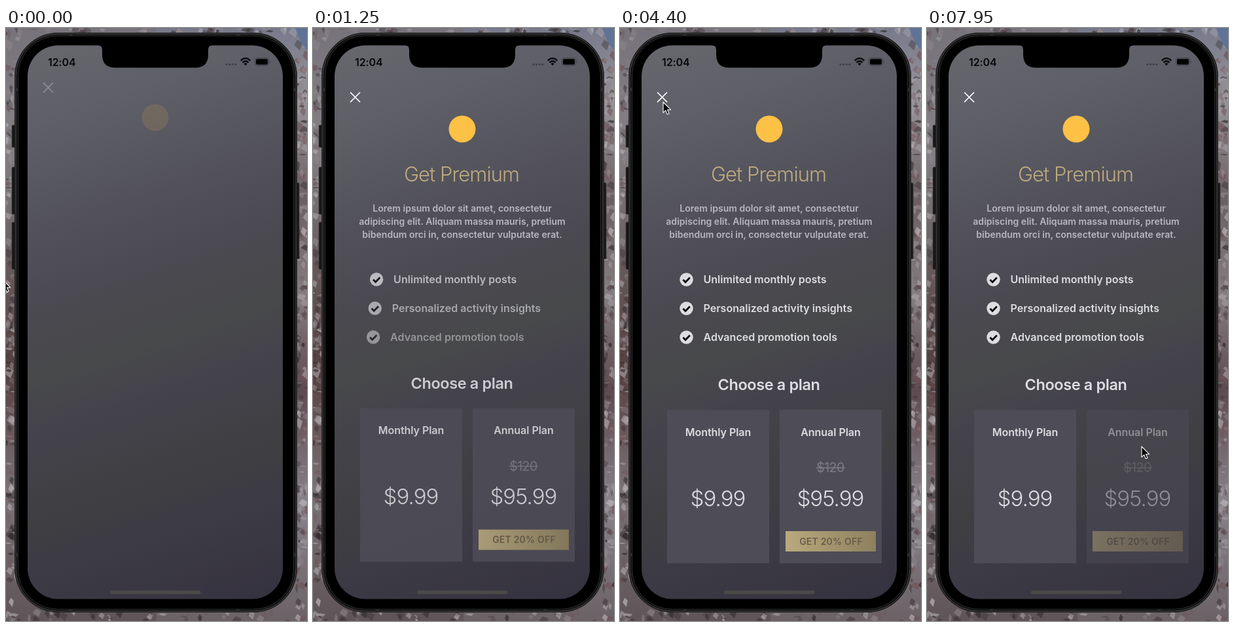
An HTML page for the animation above (8 s loop, 460 by 904 pixels).

```html
<!DOCTYPE html>
<html lang="en">
<head>
<meta charset="utf-8">
<title>Get Premium</title>
<style>
  html, body { margin: 0; width: 100%; height: 100%; overflow: hidden; background: #000; }
  svg { display: block; }
  text { font-family: Inter, "Liberation Sans", sans-serif; font-weight: 600; fill: #dddde1; white-space: pre; }
  .mid { text-anchor: middle; }
  .time { font-size: 16px; fill: #08080a; letter-spacing: -.1px; }
  .title { font-size: 31px; font-weight: 350; fill: #bdaa7d; letter-spacing: -.95px; }
  .lead { font-size: 14px; fill: #b8b7c0; letter-spacing: .03px; }
  .row { font-size: 16px; letter-spacing: .03px; }
  .choose { font-size: 23.5px; letter-spacing: -.4px; }
  .plan { font-size: 16px; letter-spacing: -.04px; }
  .price { font-size: 33px; font-weight: 350; letter-spacing: -.95px; }
  .old { font-size: 19.5px; font-weight: 400; fill: #7e7d87; letter-spacing: -.5px; }
  .offer { font-size: 14px; fill: #695d48; letter-spacing: .2px; }
</style>
</head>
<body>
<svg width="460" height="904" viewBox="0 0 460 904">
  <defs>
    <linearGradient id="left" x2="0" y2="1">
      <stop offset="0" stop-color="#77737b"/><stop offset=".2" stop-color="#858085"/>
      <stop offset=".4" stop-color="#665a5c"/><stop offset=".58" stop-color="#553f40"/>
      <stop offset=".78" stop-color="#7b7176"/><stop offset="1" stop-color="#5f5558"/>
    </linearGradient>
    <linearGradient id="right" x2="0" y2="1">
      <stop offset="0" stop-color="#77798a"/><stop offset=".12" stop-color="#98959b"/>
      <stop offset=".29" stop-color="#6c5f62"/><stop offset=".45" stop-color="#857d80"/>
      <stop offset=".61" stop-color="#5e4a50"/><stop offset=".8" stop-color="#88828a"/>
      <stop offset="1" stop-color="#6b6266"/>
    </linearGradient>
    <linearGradient id="glass" gradientUnits="userSpaceOnUse" x1="33" y1="27" x2="322" y2="905">
      <stop offset="0" stop-color="#67686d"/><stop offset=".12" stop-color="#5f6068"/>
      <stop offset=".3" stop-color="#52515b"/><stop offset=".43" stop-color="#4a4950"/>
      <stop offset=".53" stop-color="#48494a"/><stop offset=".61" stop-color="#44434c"/>
      <stop offset=".75" stop-color="#3f3f42"/><stop offset=".85" stop-color="#3c3a45"/>
      <stop offset="1" stop-color="#35323f"/>
    </linearGradient>
    <linearGradient id="gold">
      <stop offset="0" stop-color="#b9a97e"/><stop offset="1" stop-color="#8d805e"/>
    </linearGradient>
  </defs>

  <rect width="230" height="904" fill="url(#left)"/>
  <rect x="230" width="230" height="904" fill="url(#right)"/>
  <g id="bark"></g>
  <path d="M442 0H460V34Q450 24 442 0Z" fill="#5e7396"/>

  <g fill="#171717" stroke="#3d3d3d" stroke-width=".8">
    <rect x="9" y="148" width="6" height="34" rx="1.5"/>
    <rect x="9" y="212" width="6" height="72" rx="1.5"/>
    <rect x="9" y="296" width="6" height="72" rx="1.5"/>
    <rect x="442" y="236" width="6" height="116" rx="1.5"/>
  </g>
  <rect x="13.5" y="7.5" width="431" height="883" rx="66" fill="#111" stroke="#222"/>
  <rect x="15" y="9" width="428" height="880" rx="64.5" fill="none" stroke="#4d4d4d"/>
  <rect x="18.5" y="12" width="421" height="874" rx="61" fill="#000" stroke="#2b2b2b"/>
  <path d="M14 94h5M14 803h5M439 94h5M439 803h5M99 8v4M355 8v4M99 886v4M355 886v4" stroke="#2b2b2b" stroke-width="5"/>
  <rect x="33" y="26.5" width="390" height="844" rx="47" fill="url(#glass)"/>
  <path d="M141 25H315V26.5Q309 26.5 309 33V40.5Q309 60.5 289 60.5H167Q147 60.5 147 40.5V33Q147 26.5 141 26.5Z"/>

  <text class="time" x="64" y="57.5">12:04</text>
  <g fill="#3f4046"><circle cx="337" cy="55.5" r="1.6"/><circle cx="341.6" cy="55.5" r="1.6"/><circle cx="346.2" cy="55.5" r="1.6"/><circle cx="350.8" cy="55.5" r="1.6"/></g>
  <g fill="none" stroke="#08080a" stroke-width="2.3">
    <path d="M358.7 49.6Q366 42.7 373.3 49.6M361.4 52.6Q366 48.4 370.6 52.6"/>
    <path d="M363.4 54.4Q366 52.3 368.6 54.4L366 57.2Z" fill="#08080a" stroke="none"/>
  </g>
  <rect x="380.5" y="45.8" width="21" height="11.4" rx="3.4" fill="none" stroke="#3d3e43"/>
  <rect x="382" y="47.3" width="18" height="8.4" rx="2"/>
  <path d="M403 49.8q2 1.7 0 3.6z" fill="#3d3e43"/>
  <rect x="159" y="857.5" width="138.5" height="5.5" rx="2.7" fill="#4b4a49"/>

  <g id="close"><path d="M57.5 98.5l14 14m0-14l-14 14" stroke="#fff" stroke-width="1.7" stroke-linecap="round"/></g>
  <circle id="badge" cx="228" cy="154" r="20.5" fill="#fdc145"/>
  <text id="title" class="title mid" x="227" y="234">Get Premium</text>
  <g id="lead" class="mid">
    <text class="lead" x="228" y="280">Lorem ipsum dolor sit amet, consectetur</text>
    <text class="lead" x="228" y="300">adipiscing elit. Aliquam massa mauris, pretium</text>
    <text class="lead" x="228" y="320">bibendum orci in, consectetur vulputate erat.</text>
  </g>
  <g id="rows"></g>
  <text id="choose" class="choose mid" x="227.5" y="552">Choose a plan</text>
  <g id="plans">
    <g id="monthly">
      <rect x="72" y="582" width="156" height="234" fill="#4e4c57"/>
      <text class="plan mid" x="150" y="621.5">Monthly Plan</text>
      <text class="price mid" x="149.5" y="728.5">$9.99</text>
    </g>
    <g id="annual">
      <rect x="244" y="582" width="156" height="234" fill="#4e4c57"/>
      <text class="plan mid" x="322" y="621.5">Annual Plan</text>
      <text class="old mid" x="321.5" y="677">$120</text>
      <path d="M299.5 670.5H344" stroke="#7e7d87" stroke-width="1.4"/>
      <text class="price mid" x="321.5" y="728.5">$95.99</text>
      <rect x="253" y="767" width="138" height="31" fill="url(#gold)"/>
      <text class="offer mid" x="322.5" y="787.5">GET 20% OFF</text>
    </g>
  </g>
  <path id="cursor" d="M0 0V16.2L3.8 12.7L6.3 18.6L9 17.4L6.5 11.7H11.6Z" stroke="#fff" stroke-width="1.1" stroke-linejoin="round"/>
</svg>
<script>
const $ = id => document.getElementById(id);
const LOOP = 8000;

function make(parent, tag, attrs, text) {
  const el = document.createElementNS("http://www.w3.org/2000/svg", tag);
  for (const k in attrs) el.setAttribute(k, attrs[k]);
  if (text) el.textContent = text;
  return parent.appendChild(el);
}

// Rough bark flecks along the visible margins
let seed = 11;
const rand = () => (seed = seed * 16807 % 2147483647) / 2147483647;
const tones = ["#aaa5a9", "#8f888c", "#41363a", "#2d2729", "#705457", "#bbb7bb"];
for (let i = 0; i < 420; i++) {
  const edge = i % 5;
  const x = edge < 2 ? rand() * 18 : edge < 4 ? 442 + rand() * 18 : rand() * 460;
  const y = edge < 4 ? rand() * 904 : rand() < .5 ? rand() * 9 : 889 + rand() * 15;
  const w = 4 + rand() * 12, h = 2 + rand() * 16;
  make($("bark"), "path", {
    d: `M${x - w / 2} ${y}l${w * .4} ${-h / 2}l${w * .6} ${h * .3}l${-w * .3} ${h * .7}z`,
    fill: tones[Math.floor(rand() * tones.length)], opacity: .3 + rand() * .4
  });
}

const rows = ["Unlimited monthly posts", "Personalized activity insights", "Advanced promotion tools"].map((label, i) => {
  const g = make($("rows"), "g", {}), y = 383.5 + i * 44;
  make(g, "circle", { cx: 101.5, cy: y, r: 10.2, fill: "#dddde1" });
  make(g, "path", { d: `M96.4 ${y + .3}l3.6 3.7l6.8-7`, fill: "none", stroke: "#0c0c0e", "stroke-width": 2.8 });
  make(g, "text", { class: "row", x: 127.5, y: y + 5.5 }, label);
  return g;
});

const ease = u => (1 - Math.cos(Math.PI * Math.min(1, Math.max(0, u)))) / 2;

// Start time of each drop-in
const drops = { close: -350, badge: -230, title: 140, lead: 145, rows: 320, choose: 470, plans: 475 };

// [element, pressed, released, fade length]
const taps = [
  ["monthly", 3050, 3170, 250], ["annual", 3550, 3670, 250],
  ["close", 4950, 4970, 190],
  ["monthly", 5950, 6070, 250], ["annual", 6400, 6520, 250],
  ["annual", 7800, 7845, 250]
];

const track = [
  [0, -5, 384], [90, -40, 384], [1750, -20, 650], [2450, 184, 606], [3180, 184, 606],
  [3420, 328, 638], [3700, 328, 638], [4390, 66, 113], [5270, 66, 113],
  [5800, 178, 657], [6100, 178, 657], [6380, 328, 638], [LOOP, 328, 638]
];

function pressAlpha(name, t) {
  const tap = taps.find(([el, down, up, fade]) => el === name && t >= down && t < up + fade);
  return tap ? .2 + .8 * ease((t - tap[2]) / tap[3]) : 1;
}

function place(el, x, y, alpha) {
  el.setAttribute("transform", `translate(${x.toFixed(2)} ${y.toFixed(2)})`);
  el.setAttribute("opacity", alpha.toFixed(3));
}

function draw(t) {
  for (const name in drops) {
    const p = ease((t - drops[name]) / 1000);
    place($(name), 0, -20 * (1 - p), p * pressAlpha(name, t));
  }
  rows.forEach((row, i) => {
    const p = ease((t + 540 - 220 * i) / 2600);
    place(row, -20 * (1 - p), 0, p);
  });
  for (const name of ["monthly", "annual"]) $(name).setAttribute("opacity", pressAlpha(name, t));

  const i = track.findIndex(k => k[0] > t), a = track[i - 1], b = track[i];
  const u = ease((t - a[0]) / (b[0] - a[0]));
  place($("cursor"), a[1] + (b[1] - a[1]) * u, a[2] + (b[2] - a[2]) * u, 1);
}

let start = null;
function tick(now) {
  if (start === null) start = now;
  draw(Math.max(0, now - start) % LOOP);
  requestAnimationFrame(tick);
}
draw(0);
requestAnimationFrame(tick);
</script>
</body>
</html>
```
